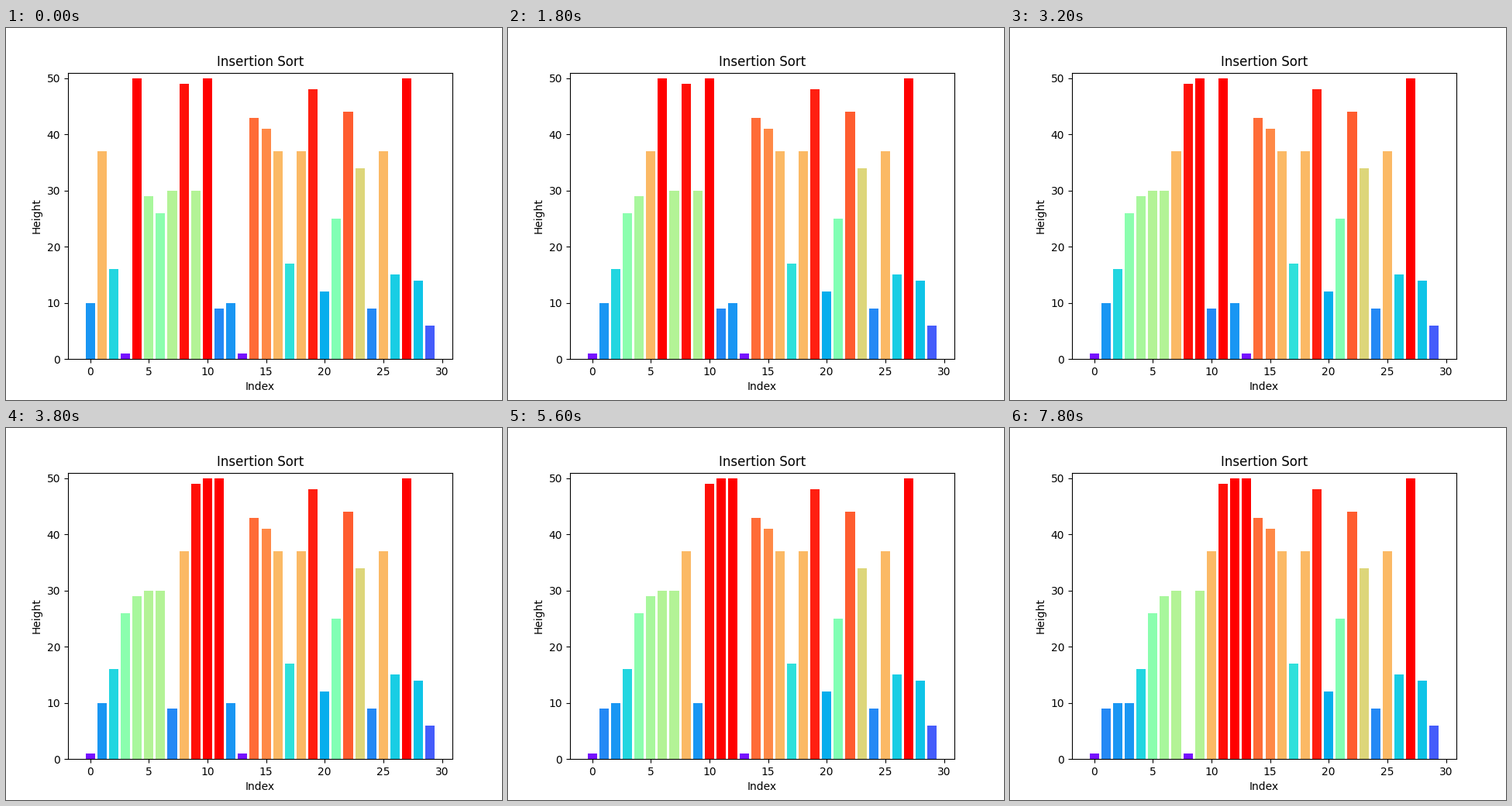
These frames come from a looping animation (640x480 px, 8000 ms). A matplotlib script:

```python
import matplotlib.pyplot as plt
from matplotlib.animation import FuncAnimation

# The unsorted input; every later state follows from the sort itself.
HEIGHTS = [10, 37, 16, 1, 50, 29, 26, 30, 49, 30,
           50, 9, 10, 1, 43, 41, 37, 17, 37, 48,
           12, 25, 44, 34, 9, 37, 15, 50, 14, 6]
TOP = max(HEIGHTS)
FRAMES = 40
INTERVAL = 200


def sort_after(swaps):
    """Return the heights after the given number of insertion sort swaps."""
    values = list(HEIGHTS)
    for i in range(1, len(values)):
        j = i
        while j > 0 and values[j - 1] > values[j]:
            if swaps == 0:
                return values
            values[j - 1], values[j] = values[j], values[j - 1]
            j -= 1
            swaps -= 1
    return values


fig, ax = plt.subplots(figsize=(6.4, 4.8), dpi=100)
bars = ax.bar(range(len(HEIGHTS)), HEIGHTS)
ax.set_ylim(0, TOP + 1)
ax.set_title("Insertion Sort")
ax.set_xlabel("Index")
ax.set_ylabel("Height")


def update(frame):
    for bar, height in zip(bars, sort_after(frame)):
        bar.set_height(height)
        bar.set_facecolor(plt.cm.rainbow(height / TOP))
    return list(bars)


anim = FuncAnimation(fig, update, frames=FRAMES, interval=INTERVAL,
                     init_func=lambda: update(0), repeat=True,
                     repeat_delay=0, blit=False)
plt.show()
```
